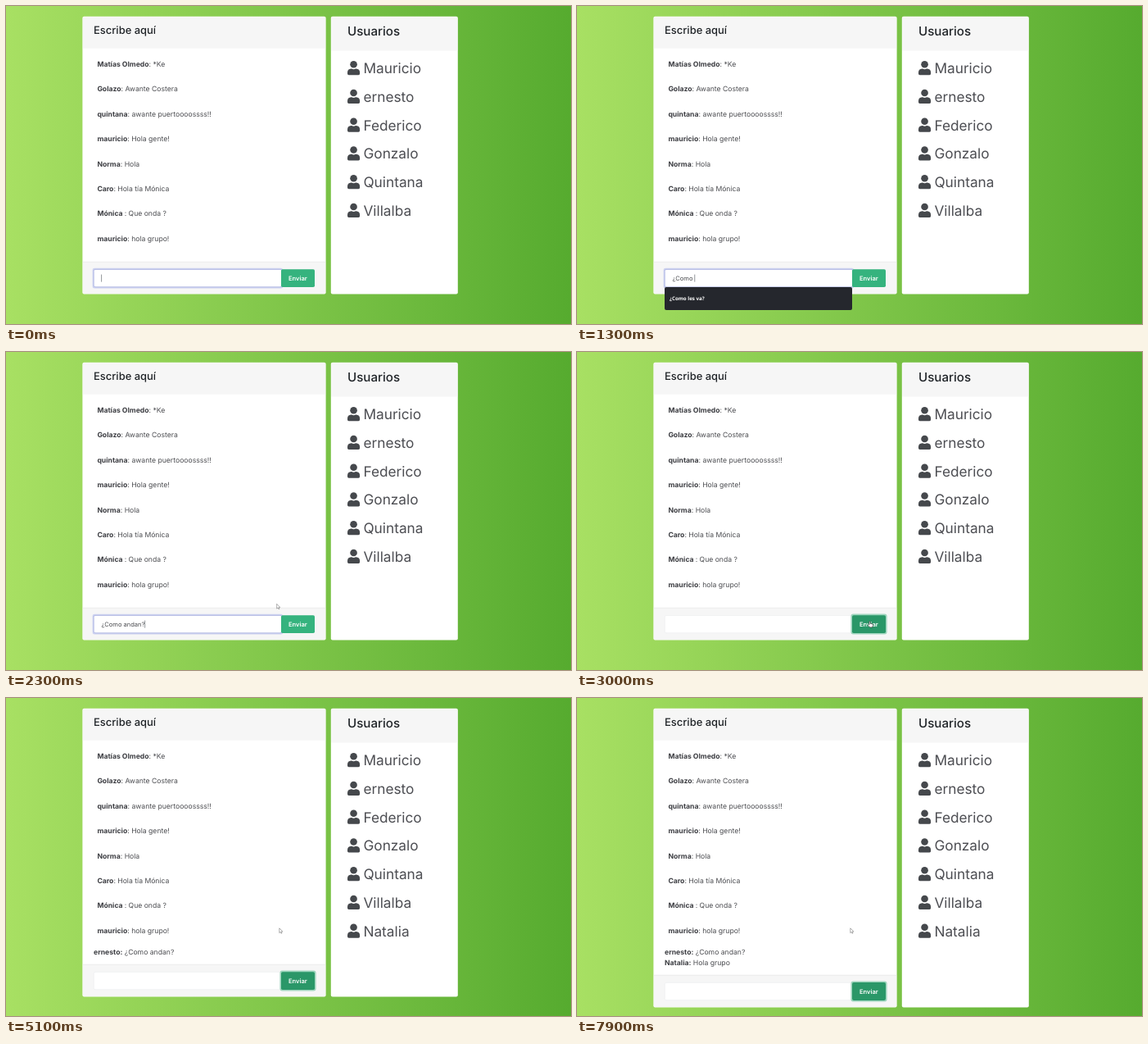
Animation, 690 px wide and 388 px high, one loop 8 s. Source, as an HTML page:

```html
<!DOCTYPE html>
<html lang="es">
<head>
<meta charset="utf-8">
<title>Chat</title>
<style>
  html, body { margin: 0; width: 100%; height: 100%; overflow: hidden; }
  body { background: linear-gradient(to right, #a8e063, #56ab2f); }
  svg { display: block; width: 690px; height: 388px; font-family: Inter, sans-serif; text-rendering: geometricPrecision; }
  text { white-space: pre; font-feature-settings: "calt" 0; }
  .card { fill: #fff; }
  .cap { fill: #f6f6f6; }
  .rule { stroke: rgba(0, 0, 0, .1); stroke-width: .6; }
  .title { fill: #212529; font-weight: 500; }
  .msg { fill: #4b4c50; font-size: 8.64px; }
  .msg .who { fill: #3d3e43; font-weight: 700; }
  .user { fill: #4d4e53; font-size: 17.28px; }
  .field { fill: #4b4c50; font-size: 7.56px; }
  .send { fill: #fff; font-size: 7.56px; font-weight: 600; }
  .hint { fill: #fff; font: 700 6.2px "Open Sans", sans-serif; }
</style>
</head>
<body>
<svg viewBox="0 0 690 388">
  <defs>
    <g id="person" fill="#45484c">
      <circle cx="7.55" cy="4.32" r="4.32"/>
      <path d="M4.5 9.7H5.1Q7.55 10.8 10 9.7H10.6Q15.1 10 15.1 14.2V15.7Q15.1 17.28 13.5 17.28H1.6Q0 17.28 0 15.7V14.2Q0 10 4.5 9.7Z"/>
    </g>
  </defs>

  <rect id="chatCard" class="card" x="93.4" y="12.8" width="297.2" rx="2"/>
  <path class="cap" d="M93.9 51.8V15q0-1.7 1.7-1.7H388.4q1.7 0 1.7 1.7V51.8Z"/>
  <text class="title" x="107" y="34" font-size="12.96">Escribe aquí</text>
  <g id="messages"></g>

  <rect id="userCard" class="card" x="396.8" y="12.8" width="155" rx="2"/>
  <path class="cap" d="M397.3 54.4V15q0-1.7 1.7-1.7H549.6q1.7 0 1.7 1.7V54.4Z"/>
  <text class="title" x="417" y="36.4" font-size="15.12">Usuarios</text>
  <g id="users"></g>

  <g id="footer">
    <path class="cap" d="M93.9 312.2H390.1V349.4q0 1.7-1.7 1.7H95.6q-1.7 0-1.7-1.7Z"/>
    <path class="rule" d="M93.9 312.2H390.1"/>
    <rect id="halo" x="105.6" y="319.8" width="232.6" height="24.6" rx="2.5" fill="#cdd2f0"/>
    <rect id="box" x="107.2" y="321.4" width="229.6" height="21.4" rx="1.8" fill="#fff" stroke-width=".7"/>
    <text id="typed" class="field" x="116.4" y="334.6"></text>
    <path id="caret" d="M0 327.6V336.6" stroke="#495057" stroke-width=".6"/>
    <rect id="ring" x="334.4" y="319.6" width="44.2" height="25" rx="3" fill="#9fd6be"/>
    <rect id="button" x="336" y="321.2" width="41" height="21.8" rx="1.8"/>
    <text class="send" x="356.4" y="334.6" text-anchor="middle">Enviar</text>
  </g>

  <g id="popup">
    <rect id="popBox" y="343" height="28" rx="2" fill="#25272d"/>
    <text id="popText" class="hint" y="358.9">¿Como les va?</text>
  </g>

  <g id="arrow" fill="#fff" stroke="#777" stroke-width=".6" stroke-linejoin="round">
    <path d="M0 0V5.8L1.4 4.6L2.3 6.5L3.2 6.1L2.4 4.2H4.1Z"/>
  </g>
  <g id="hand" fill="#fff" stroke="#222" stroke-width=".6" stroke-linejoin="round">
    <path d="M1.3 4.6V.8Q2 -.2 2.6 .8V3L5.5 3.6Q6 3.9 5.8 5L5.2 7.6H2.1L0 5.1Q.2 4.2 1.3 4.6Z"/>
  </g>
</svg>

<script>
const LOOP = 8000, STEP = 100;
const CLICK = 2700, SENT = 3500, JOINED = 4600, REPLY = 7800;
const LINE = 12.96;
const $ = id => document.getElementById(id);

const chat = [
  ["Matías Olmedo", ": *Ke"],
  ["Golazo", ": Awante Costera"],
  ["quintana", ": awante puertoooossss!!"],
  ["mauricio", ": Hola gente!"],
  ["Norma", ": Hola"],
  ["Caro", ": Hola tía Mónica"],
  ["Mónica ", ": Que onda ?"],
  ["mauricio", ": hola grupo!"]
];
const people = ["Mauricio", "ernesto", "Federico", "Gonzalo", "Quintana", "Villalba", "Natalia"];

// [time, characters typed]
const typing = [[0, 0], [400, 1], [600, 2], [700, 3], [800, 4], [1100, 5], [1200, 6],
  [1400, 7], [1500, 8], [1700, 9], [1800, 10], [1900, 11], [2100, 12], [CLICK, 0]];
const phrase = "¿Como andan?";

// [time, x, y] of the pointer
const path = [[2200, 322, 300], [2500, 355.5, 328.3], [3200, 355.5, 328.3],
  [3600, 344.5, 324], [5000, 344.5, 324], [5100, 333.8, 280.8]];

function add(parent, tag, attrs, text = "") {
  const el = document.createElementNS("http://www.w3.org/2000/svg", tag);
  for (const key in attrs) el.setAttribute(key, attrs[key]);
  el.textContent = text;
  parent.append(el);
  return el;
}

function addMessage(who, words, x, y) {
  const line = add($("messages"), "text", { class: "msg", x, y });
  add(line, "tspan", { class: "who" }, who);
  add(line, "tspan", {}, words);
  return line;
}

chat.forEach(([who, words], i) => addMessage(who, words, 111.4, 74 + i * 30.4));
const sent = addMessage("ernesto:", " ¿Como andan?", 107, 313);
const reply = addMessage("Natalia:", " Hola grupo", 107, 313 + LINE);

const rows = people.map((name, i) => {
  const row = add($("users"), "g", { transform: `translate(417 ${66.9 + i * 34.75})` });
  add(row, "use", { href: "#person" });
  add(row, "text", { class: "user", x: 19.4, y: 15.2 }, name);
  return row;
});
const newcomer = rows[rows.length - 1];

const set = (el, attrs) => { for (const key in attrs) el.setAttribute(key, attrs[key]); };
const show = (el, on) => { el.style.visibility = on ? "visible" : "hidden"; };

function pointerAt(t) {
  const next = path.findIndex(p => p[0] > t);
  if (next < 0) return path[path.length - 1].slice(1);
  if (next === 0) return path[0].slice(1);
  const [a, b] = [path[next - 1], path[next]];
  const u = (t - a[0]) / (b[0] - a[0]);
  const ease = u * u * (3 - 2 * u);
  return [1, 2].map(k => a[k] + (b[k] - a[k]) * ease);
}

function draw(t) {
  const extra = (t >= SENT) + (t >= REPLY);
  const height = 338.8 + extra * LINE;
  set($("chatCard"), { height });
  set($("userCard"), { height });
  set($("footer"), { transform: `translate(0 ${extra * LINE})` });
  show(sent, t >= SENT);
  show(reply, t >= REPLY);
  show(newcomer, t >= JOINED);

  const focused = t < CLICK;
  show($("halo"), focused);
  set($("box"), { stroke: focused ? "#a3abdf" : "#eceef0" });
  const count = typing.filter(s => s[0] <= t).pop()[1];
  $("typed").textContent = phrase.slice(0, count);
  const width = count ? $("typed").getComputedTextLength() : 0;
  set($("caret"), { transform: `translate(${116.6 + width} 0)` });
  show($("caret"), focused && !(t >= 800 && t < 1100));

  show($("ring"), !focused);
  set($("button"), { fill: t >= 2500 ? "#2a9768" : "#35b37e" });

  const alpha = t < 600 ? 0 : Math.max(0, Math.min(1, (1800 - t) / 300));
  const shift = Math.min(2.2, 6.6 * (1 - alpha));
  set($("popup"), { opacity: alpha });
  set($("popBox"), { x: 107 + shift, width: 229 - shift });
  set($("popText"), { x: 113 + shift });

  const [x, y] = pointerAt(t);
  const over = t >= 2500 && t < 3400;
  for (const id of ["arrow", "hand"]) set($(id), { transform: `translate(${x} ${y})` });
  show($("hand"), over);
  show($("arrow"), t >= 2200 && !over);
}

const start = performance.now();
function tick() {
  const t = (performance.now() - start) % LOOP;
  draw(Math.floor(t / STEP) * STEP);
  requestAnimationFrame(tick);
}
tick();
</script>
</body>
</html>
```
